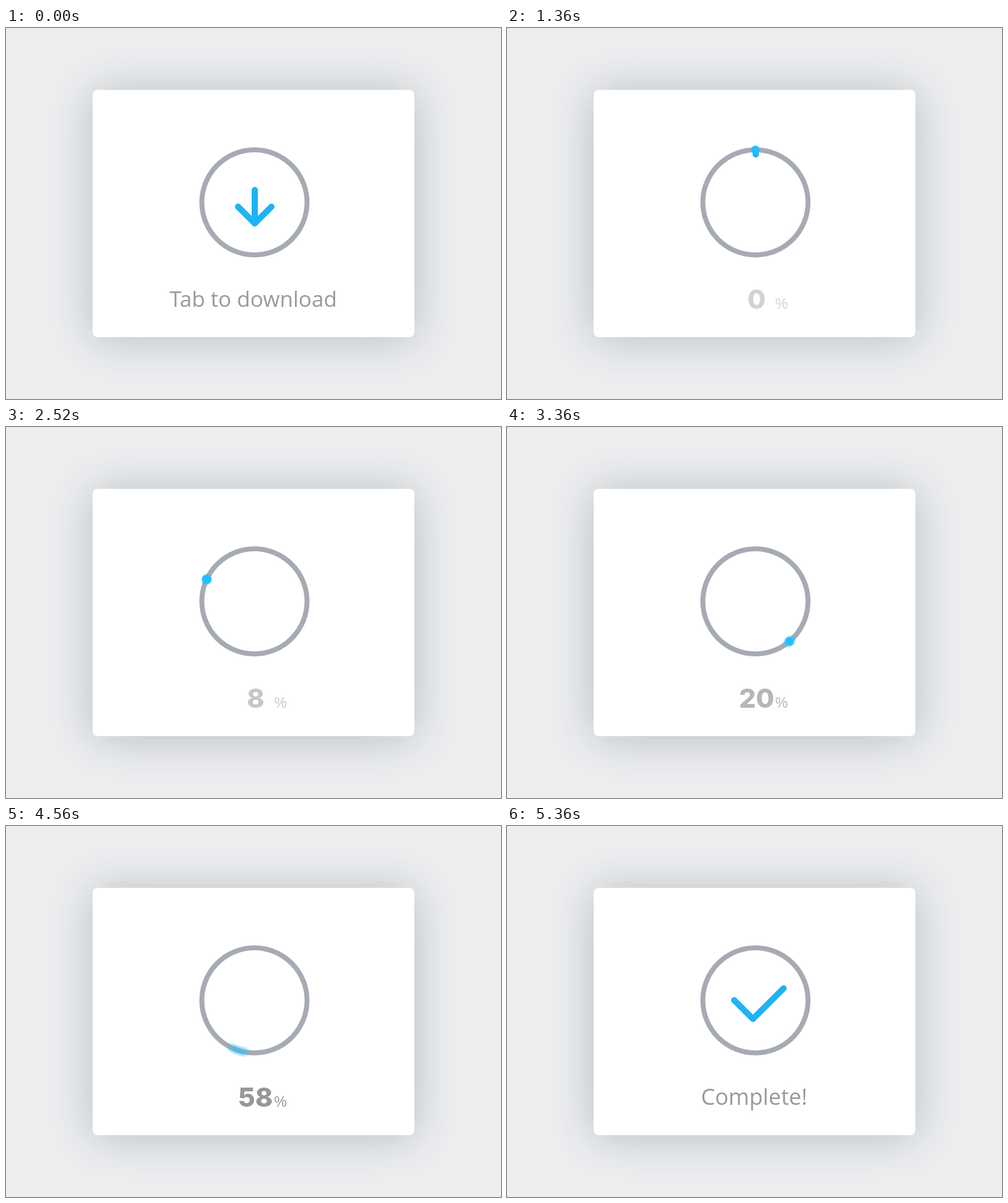
Write an HTML page that moves like this. It is 800 by 600 pixels and loops after 6 s.

```html
<!DOCTYPE html>
<html lang="en">
<head>
<meta charset="utf-8">
<title>Download button</title>
<style>
  html, body { margin: 0; width: 100%; height: 100%; overflow: hidden; background: #edeef0; }
  .card {
    position: absolute; left: 140px; top: 100px; width: 520px; height: 400px;
    border-radius: 8px; background: #fff;
    box-shadow: 0 3px 72px rgba(20, 45, 52, .25);
  }
  svg { position: absolute; left: 0; top: 0; }
  .line { fill: none; stroke: #1db4f5; stroke-width: 10; stroke-linecap: round; stroke-linejoin: round; }
  .label { font-family: "Open Sans", "Noto Sans", sans-serif; text-anchor: middle; fill: #999; }
  #progress { fill: #979797; }
  #count { font: 800 43px Inter, sans-serif; text-anchor: middle; }
  #unit { font: 23px "Liberation Sans", Arial, sans-serif; }
  #dot { isolation: isolate; fill: #1db4f5; }
  #dot circle { mix-blend-mode: plus-lighter; }
</style>
</head>
<body>
<div class="card"></div>
<svg width="800" height="600" viewBox="0 0 800 600">
  <circle cx="401.5" cy="282" r="85" fill="none" stroke="#a6abb3" stroke-width="8"/>
  <path id="wings" class="line"/>
  <path id="shaft" class="line"/>
  <path id="check" class="line" d="M316.5 282C316.5 262 350 265 367 281.5L397.5 312 447 262.5"/>
  <g id="dot"></g>
  <text id="start" class="label" x="399.5" y="451" font-size="35">Tab to download</text>
  <g id="progress">
    <text id="count" x="403.5" y="453.5"></text>
    <text id="unit" x="433.5" y="454">%</text>
  </g>
  <text id="done" class="label" x="399.5" y="451" font-size="36">Complete!</text>
</svg>
<script>
const LOOP = 6000, STEP = 40, SHUTTER = 20, SAMPLES = 16;
const CX = 401.5, CY = 282, RADIUS = 85;
const el = id => document.getElementById(id);
const [wings, shaft, check, dot, start, progress, count, done] =
  ['wings', 'shaft', 'check', 'dot', 'start', 'progress', 'count', 'done'].map(el);

const clamp = x => Math.min(1, Math.max(0, x));
const linear = (t, a, b) => clamp((t - a) / (b - a));
const ease = (t, a, b) => { const u = linear(t, a, b); return u * u * (3 - 2 * u); };
const mix = (a, b, u) => a + (b - a) * u;
const show = (node, visible) => { node.style.display = visible ? '' : 'none'; };

const checkLength = check.getTotalLength();
const leadLength = checkLength - Math.hypot(30.5, 30.5) - Math.hypot(49.5, 49.5);

const samples = Array.from({ length: SAMPLES }, () => {
  const c = document.createElementNS('http://www.w3.org/2000/svg', 'circle');
  c.setAttribute('opacity', 1 / SAMPLES);
  return dot.appendChild(c);
});

// Counter-clockwise degrees from the top, speeding up until the left side
function angle(t) {
  if (t < 2000) return 18.8 * Math.max(0, (t - 1442) / 558) ** 2;
  return Math.min(1170, 46 * (Math.exp(.00104 * (t - 1671)) - 1));
}

function drawArrow(t) {
  const fold = ease(t, 1000, 1200);
  const top = mix(262, 198, ease(t, 1080, 1300));
  const bottom = mix(316, 198, ease(t, 1120, 1400));
  const span = 27 * (1 - fold);
  wings.setAttribute('d', `M${402 - span} ${bottom - span}L402 ${bottom}L${402 + span} ${bottom - span}`);
  shaft.setAttribute('d', `M402 ${top}V${bottom}`);
  show(wings, t < 1200);
  show(shaft, t < 1400);
}

function drawDot(t) {
  const r = mix(4, 8, linear(t, 1260, 1400)) * (1 - linear(t, 4840, 4960));
  show(dot, t >= 1280 && r > 0);
  samples.forEach((c, i) => {
    const a = angle(t + ((i + .5) / SAMPLES - .5) * SHUTTER) * Math.PI / 180;
    c.setAttribute('cx', CX - RADIUS * Math.sin(a));
    c.setAttribute('cy', CY - RADIUS * Math.cos(a));
    c.setAttribute('r', r);
  });
}

function drawCheck(t) {
  const head = checkLength * ease(t, 4840, 5240);
  const tail = leadLength * ease(t, 4920, 5320);
  check.setAttribute('stroke-dasharray', `${Math.max(.01, head - tail)} 999`);
  check.setAttribute('stroke-dashoffset', -tail);
  show(check, t > 4840);
}

function drawText(t) {
  const leave = ease(t, 1000, 1240);
  start.setAttribute('opacity', 1 - leave);
  start.setAttribute('y', 451 + 8 * leave);

  const tone = (44 + 60 * linear(t, 1360, 4560) ** 1.6) / 104;
  const visible = linear(t, 1200, 1340) * (1 - linear(t, 4840, 5000));
  progress.setAttribute('opacity', tone * visible);
  count.textContent = Math.floor(Math.max(0, 4.74 * (Math.exp(.00076 * (t - 1158)) - 1)));

  const enter = ease(t, 4960, 5360);
  done.setAttribute('opacity', enter);
  done.setAttribute('y', 451 + 40 * (1 - enter));
}

function frame() {
  const t = Math.floor(performance.now() % LOOP / STEP) * STEP;
  drawArrow(t);
  drawDot(t);
  drawCheck(t);
  drawText(t);
  requestAnimationFrame(frame);
}
frame();
</script>
</body>
</html>
```
